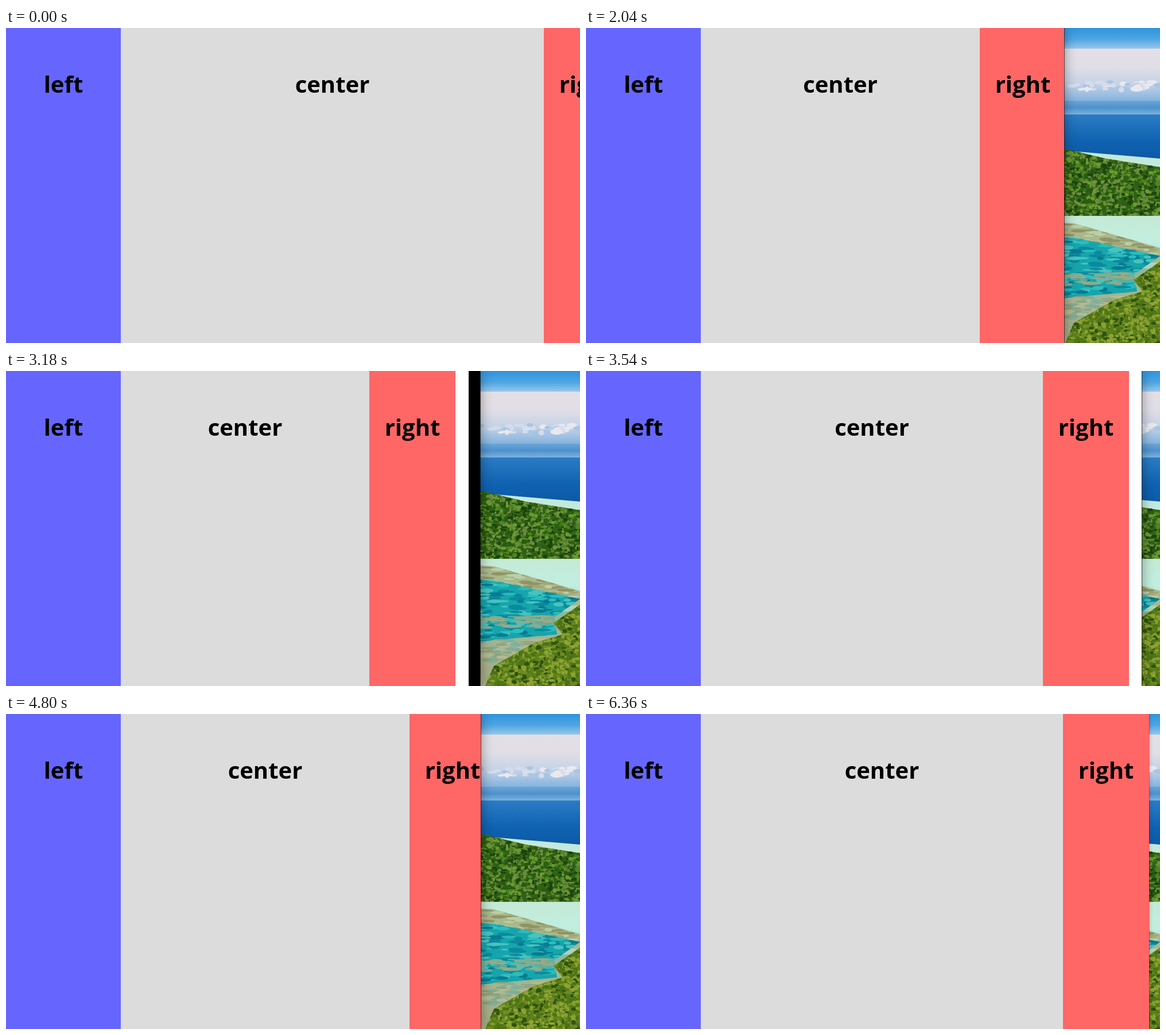
An HTML page with a canvas for the animation above (6.42 s loop, 1000 by 550 pixels).

```html
<!DOCTYPE html>
<html lang="en">
<head>
<meta charset="utf-8">
<title>Three column layout</title>
<style>
  html, body { margin: 0; width: 100%; height: 100%; overflow: hidden; }
  canvas, div { position: absolute; top: 0; left: 0; height: 550px; }
  #win { overflow: hidden; background: #000; }
  #blank { background: #fff; }
  .panel {
    overflow: hidden; color: #000; text-align: center; white-space: nowrap;
    font: bold 40px/56px "Open Sans", "Noto Sans", sans-serif;
  }
  .panel span { position: absolute; top: 70px; left: 0; width: 100%; }
  #left { width: 200px; background: #66f; }
  #center { left: 200px; background: #dcdcdc; }
  #right { width: 150px; background: #f66; }
</style>
</head>
<body>
<canvas id="photo" width="1000" height="550"></canvas>
<div id="win">
  <div id="blank"></div>
  <div id="left" class="panel"><span>left</span></div>
  <div id="center" class="panel"><span>center</span></div>
  <div id="right" class="panel"><span>right</span></div>
</div>
<script>
const $ = id => document.getElementById(id);
const LOOP = 6420, STEP = 60, RIGHT_WIDTH = 150, UNPAINTED = 23;

// Drag of the window: time, left side of the right column
const drag = [
  [0, 937], [1200, 937], [1260, 935], [1860, 754], [2040, 686], [2100, 683],
  [2520, 598], [2850, 545], [3180, 633], [3240, 676], [4140, 931], [4200, 931],
  [4500, 840], [5070, 628], [5160, 640], [5400, 767], [5460, 772], [5760, 831],
  [LOOP + STEP, 831]
];

// Smooth curve through the drag points, without overshoot
function sideAt(t) {
  const slope = i => drag[i] && drag[i + 1]
    ? (drag[i + 1][1] - drag[i][1]) / (drag[i + 1][0] - drag[i][0]) : 0;
  const tangent = i => {
    const a = slope(i - 1), b = slope(i);
    return a * b > 0 ? 2 * a * b / (a + b) : 0;
  };
  const i = drag.findIndex(p => p[0] > t) - 1;
  const [t0, x0] = drag[i], [t1, x1] = drag[i + 1];
  const h = t1 - t0, u = (t - t0) / h, v = 1 - u;
  return Math.round(x0 * v * v * (1 + 2 * u) + x1 * u * u * (3 - 2 * u) +
    h * u * v * (v * tangent(i) - u * tangent(i + 1)));
}

function drawPhoto() {
  const g = $("photo").getContext("2d");
  const LEFT = 650;
  let seed = 7;
  const rnd = (a, b) => {
    seed = (seed * 16807) % 2147483647;
    return a + (b - a) * seed / 2147483647;
  };
  const band = (y0, y1, ...colors) => {
    const fill = g.createLinearGradient(0, y0, 0, y1);
    colors.forEach((c, i) => fill.addColorStop(i / (colors.length - 1), c));
    g.fillStyle = fill;
    g.fillRect(LEFT, y0, 1000 - LEFT, y1 - y0);
  };
  const blobs = (n, y0, y1, w, h, ...colors) => {
    for (let i = 0; i < n; i++) {
      g.fillStyle = colors[i % colors.length];
      g.beginPath();
      g.ellipse(rnd(LEFT, 1000), rnd(y0, y1), rnd(w / 3, w), rnd(h / 3, h), 0, 0, 7);
      g.fill();
    }
  };
  // Fills a polygon, then paints the details inside it
  const area = (color, points, details = () => {}) => {
    g.save();
    g.beginPath();
    points.forEach(p => g.lineTo(...p));
    g.fillStyle = color;
    g.fill();
    g.clip();
    details();
    g.restore();
  };

  // Sky, clouds and sea
  band(0, 40, "#2f94dd", "#4fa6e3", "#a9d0ee");
  band(36, 130, "#e3dfe5", "#e2dee6", "#c3d2e6", "#7db0de");
  blobs(60, 94, 108, 11, 5, "#e9e8ef", "#d4dceb", "#a9c5e4");
  band(127, 151, "#6ba5d6", "#4d92cd", "#7eb2dc");
  band(151, 245, "#2b7cc4", "#0f62b0", "#0a55a2");
  area("#c3e9dc", [[LEFT, 202], [835, 214], [1000, 228], [1000, 250], [LEFT, 240]]);

  // Shallows and sand
  band(328, 420, "#c5e9d6", "#c1eedf", "#a9cfb8");
  band(420, 550, "#8fb79c", "#a9b48e", "#a3a985");
  area("#aab88c", [[LEFT, 330], [850, 341], [1000, 384], [1000, 410], [LEFT, 400]],
    () => blobs(260, 335, 400, 14, 3, "#8f9466", "#b9cfa6", "#9fa677"));
  area("#16a5ad", [[LEFT, 355], [850, 366], [1000, 398], [955, 430], [960, 460], [LEFT, 488]],
    () => {
      blobs(400, 360, 480, 16, 4, "#0b8a9d", "#2bbcbd", "#087b91", "#48c3bd");
      blobs(120, 428, 448, 18, 3, "#9caa82", "#6aa995", "#7fae96");
    });
  blobs(160, 466, 510, 16, 3, "#8ea17a", "#b5ba94", "#7fb09c");

  // Forest on both shores
  area("#2f6318", [[LEFT, 190], [835, 211], [905, 228], [1000, 243], [1000, 328], [LEFT, 328]],
    () => blobs(3500, 190, 328, 5, 4,
      "#28590f", "#4d8520", "#6c9a32", "#2f6014", "#6d8a40", "#1b430e"));
  area("#5d801a", [[835, 550], [850, 515], [920, 475], [970, 460], [954, 440], [1000, 408], [1000, 550]],
    () => blobs(3000, 405, 550, 5, 4,
      "#4f7716", "#87a32a", "#8fa336", "#4c7017", "#2f520e", "#6d8b26"));
}

function render(now) {
  const t = Math.floor(now % LOOP / STEP) * STEP;
  const side = sideAt(t);
  // The page is painted one step behind the window edge
  const edge = sideAt(t + STEP) + RIGHT_WIDTH;
  $("center").style.width = side - 200 + "px";
  $("right").style.left = side + "px";
  $("blank").style.width = side + RIGHT_WIDTH + UNPAINTED + "px";
  $("win").style.width = edge + "px";
  $("win").style.boxShadow = t < LOOP - STEP
    ? "1px 0 #0009, 0 0 20px #0006"
    : "1px 0 #0004, 0 0 8px #0003";
}

drawPhoto();
const start = performance.now();
function tick() {
  render(performance.now() - start);
  requestAnimationFrame(tick);
}
tick();
</script>
</body>
</html>
```
